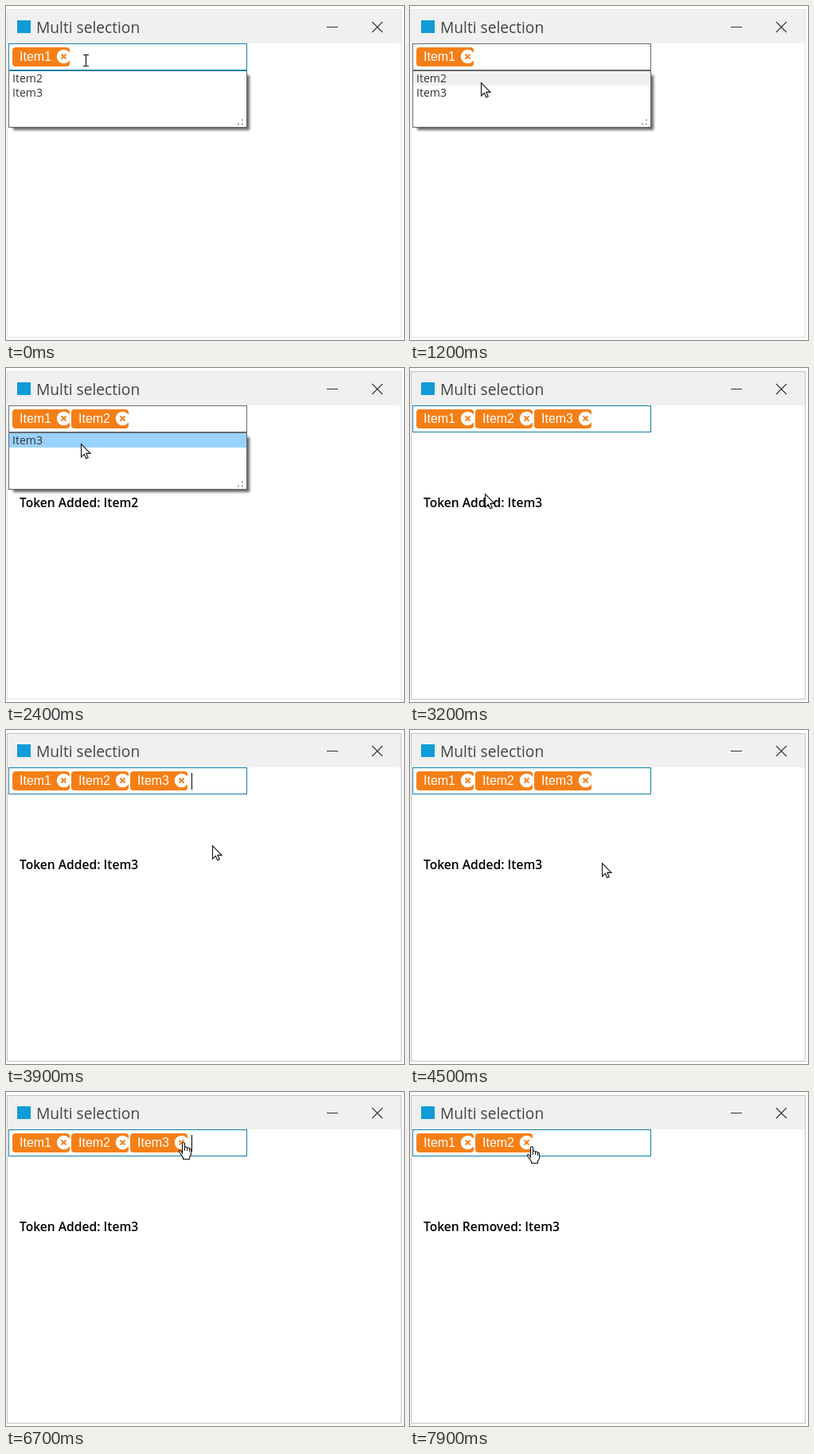
Recreate the animation shown at these times as an HTML page with a canvas. Size 500 by 420 pixels, loop 8000 ms.

```html
<!DOCTYPE html>
<html lang="en">
<head>
<meta charset="utf-8">
<title>Multi selection</title>
<style>
  html, body { margin: 0; width: 100%; height: 100%; overflow: hidden; background: #fff; }
  canvas { display: block; }
</style>
</head>
<body>
<canvas id="stage" width="500" height="420"></canvas>
<script>
const c = document.getElementById('stage').getContext('2d');
const LOOP = 8000, STEP = 100;
const UI = '"Open Sans", "Noto Sans", sans-serif';
const ORANGE = '#f57f17';

// Moments at which the state changes
const ADD_2 = 1500, ADD_3 = 2500, CLOSE = 3100, REMOVE_3 = 7100;

// Pointer hotspot: time, x, y
const route = [
  [0, 100, 68], [100, 100, 68], [700, 89, 96], [1500, 89, 96],
  [2000, 94, 95], [2600, 94, 95], [2900, 94, 158], [3200, 94, 158],
  [3800, 259, 145], [3900, 259, 145], [4300, 262, 194], [4700, 220, 140],
  [5100, 223, 65], [6000, 223, 65], [6600, 222, 64], [7200, 222, 64],
  [7600, 152, 69], [LOOP, 152, 69]
];

function pointerAt(t) {
  const i = route.findIndex(p => p[0] > t);
  const [t0, x0, y0] = route[i - 1], [t1, x1, y1] = route[i];
  const k = (t - t0) / (t1 - t0), e = k * k * (3 - 2 * k);
  return [Math.round(x0 + (x1 - x0) * e), Math.round(y0 + (y1 - y0) * e)];
}

function rect(x, y, w, h, color) {
  c.fillStyle = color;
  c.fillRect(x, y, w, h);
}

function frame(x, y, w, h, color) {
  c.strokeStyle = color;
  c.lineWidth = 1;
  c.strokeRect(x + .5, y + .5, w - 1, h - 1);
}

function text(str, x, y, font, color) {
  c.font = font;
  c.fillStyle = color;
  c.fillText(str, x, y);
}

function lines(color, width, ...segments) {
  c.strokeStyle = color;
  c.lineWidth = width;
  c.beginPath();
  for (const [x0, y0, x1, y1] of segments) {
    c.moveTo(x0, y0);
    c.lineTo(x1, y1);
  }
  c.stroke();
}

function drawWindow(active) {
  rect(0, 0, 500, 420, '#fff');
  rect(1, 4, 496, 43, '#f0f0f0');
  frame(1, 4, 496, 413, active ? '#c3c3c3' : '#e2e2e2');
  rect(14, 18, 17, 16, '#109cd8');
  text('Multi selection', 38, 34, '19.2px ' + UI, '#444');
  lines('#333', 1, [403, 26.5, 417, 26.5]);
  lines('#333', 1.1, [460, 20, 473, 33], [473, 20, 460, 33]);
}

function drawToken(n) {
  const x = 8 + 74 * (n - 1);
  c.fillStyle = ORANGE;
  c.beginPath();
  c.roundRect(x, 52, 72, 24, 4);
  c.fill();
  c.save();
  c.clip();
  c.fillStyle = '#fff';
  c.beginPath();
  c.arc(x + 64.5, 63.5, 8.7, 0, 7);
  c.fill();
  c.restore();
  lines(ORANGE, 1.8, [x + 61.5, 60.5, x + 67.5, 66.5], [x + 67.5, 60.5, x + 61.5, 66.5]);
  text('Item' + n, x + 9, 69, '16px "Liberation Sans", Arial, sans-serif', '#fff');
}

function drawPopup(items, highlight, edge) {
  c.save();
  c.shadowColor = 'rgba(0,0,0,.6)';
  c.shadowBlur = 3;
  c.shadowOffsetX = c.shadowOffsetY = 3;
  rect(6, 84, 297, 69, '#fff');
  c.restore();
  rect(3, 81, 300, 72, '#fff');
  frame(3, 81, 300, 72, '#606468');
  rect(3, 80, 300, 2, edge);
  if (highlight) rect(4, 82, 298, 18, highlight);
  items.forEach((n, i) => text('Item' + n, 8, 96 + 18 * i, '14.1px ' + UI, '#333'));
  for (const [x, y] of [[296, 142], [291, 147], [296, 147]]) rect(x, y, 2, 3, '#bbb');
}

const arrow = new Path2D('M.5 .5V17L4.3 13.4L6.8 18.8L9.2 17.8L6.8 12.4H12Z');
const hand = new Path2D('M4.5 14V2Q4.5 .5 6 .5T7.5 2V7Q8 6 9.2 6T10.5 7.4Q11 6.8 12.2 7' +
  'T13.4 8.4Q15.5 7.6 15.5 10V15Q15.5 17 13.5 19V21.5H5.5V19.5L1 13Q0 11 1.2 10.6T4.5 14Z');

function drawPointer(x, y, tokens) {
  const inField = y < 81;
  const slot = (x - 8) % 74;
  const onClose = x < 8 + 74 * tokens && slot > 55 && slot < 72;
  if (inField && !onClose) {
    lines('#111', 1.2, [x + .5, y - 6, x + .5, y + 7],
      [x - 3, y - 6.5, x + 4, y - 6.5], [x - 3, y + 7.5, x + 4, y + 7.5]);
    return;
  }
  c.save();
  c.translate(inField ? x - 5 : x, inField ? y - 1 : y);
  const shape = inField ? hand : arrow;
  c.fillStyle = '#fff';
  c.fill(shape);
  c.strokeStyle = '#111';
  c.lineWidth = 1.1;
  c.stroke(shape);
  if (inField) lines('#111', 1, [7.5, 7, 7.5, 11], [10.5, 8, 10.5, 11], [13.4, 9, 13.4, 12]);
  c.restore();
}

function draw(t) {
  const [x, y] = pointerAt(t);
  const open = t < CLOSE;
  const tokens = t < ADD_2 ? 1 : t < ADD_3 || t >= REMOVE_3 ? 2 : 3;
  const edge = !open || y < 81 ? '#1480a8' : '#666a6e';

  drawWindow(!open);
  if (open) {
    const pressed = (t >= 1300 && t < ADD_2) || (t >= 2300 && t < ADD_3);
    const hovered = tokens < 3 && y > 81;
    drawPopup([2, 3].slice(tokens - 1), pressed ? '#99d1ff' : hovered && '#f0f0f0', edge);
  }
  rect(4, 48, 298, 32, '#fff');
  frame(3, 47, 300, 34, edge);
  for (let n = 1; n <= tokens; n++) drawToken(n);

  const caretOn = Math.floor((t - 3660) / 610) % 2 === 0;
  if (!open && t < REMOVE_3 && caretOn) rect(233, 54, 1, 21, '#000');

  if (t >= ADD_2) {
    const message = t >= REMOVE_3 ? 'Removed: Item3' : 'Added: Item' + tokens;
    text('Token ' + message, 17, 175, '600 15.6px ' + UI, '#000');
  }
  drawPointer(x, y, tokens);
}

function tick() {
  const t = performance.now() % LOOP;
  draw(Math.floor(t / STEP) * STEP);
  requestAnimationFrame(tick);
}
tick();
</script>
</body>
</html>
```
